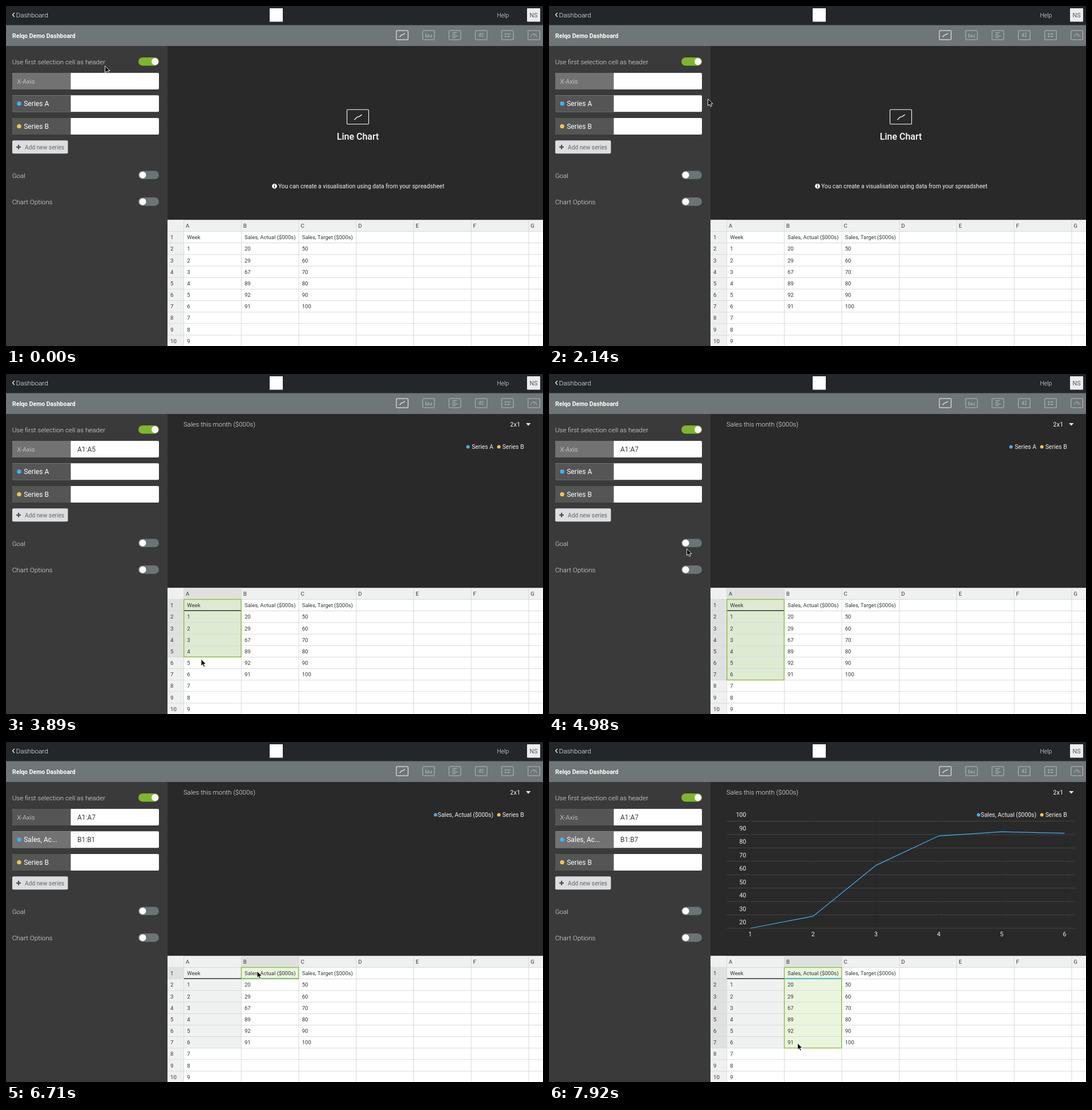
These frames come from a looping animation (941x595 px, 8 s). An HTML page:

```html
<!DOCTYPE html>
<html lang="en">
<head>
<meta charset="utf-8">
<title>Dashboard chart builder</title>
<style>
  html, body { margin: 0; width: 100%; height: 100%; overflow: hidden; background: #292929; }
  svg { display: block; width: 100%; height: 100%; }
  text { font-family: Roboto, "Liberation Sans", Arial, sans-serif; white-space: pre; }
</style>
</head>
<body>
<svg id="stage" viewBox="0 0 941 595"></svg>
<script>
const LOOP = 8000;
const CLICK_A = 2950, FOCUS_B = 5800, CLICK_B = 6710;
const BLUE = '#3fb0f2', YELLOW = '#e6c84f', GREEN = '#8bc03f';
const GRID_X = 312, GRID_Y = 394.5, COL_W = 100.72, ROW_H = 20.17;
const FIELD_Y = [117, 156.3, 196];

// t, x, y, eased
const path = [
  [0, 173.5, 105], [119, 173.5, 105], [120, 199, 103], [240, 200, 103],
  [930, 695, 55, 1], [1110, 695, 55], [1280, 588.5, 80], [1850, 268.5, 125], [1970, 268.5, 125],
  [2710, 342.5, 404, 1], [3250, 342.5, 404], [3890, 342, 499], [3950, 341.5, 511], [4000, 341, 518],
  [4120, 339.5, 521], [4630, 339.5, 521], [5210, 190, 193, 1], [5450, 190, 193], [5690, 179.5, 181, 1],
  [6040, 179.5, 181], [6220, 235, 142], [6540, 440, 401], [6890, 440, 401], [7160, 436.5, 460],
  [7600, 435, 516], [7750, 435, 521], [7920, 435.5, 527], [LOOP, 435.5, 527]
];
const header = ['Week', 'Sales, Actual ($000s)', 'Sales, Target ($000s)'];
const actual = [20, 29, 67, 89, 92, 91];
const target = [50, 60, 70, 80, 90, 100];

const colX = i => GRID_X + COL_W * i;
const rowY = i => GRID_Y + ROW_H * i;
const rect = (x, y, w, h, fill, extra = '') =>
  `<rect x="${x}" y="${y}" width="${w}" height="${h}" fill="${fill}" ${extra}/>`;
const dot = (x, y, r, fill) => `<circle cx="${x}" cy="${y}" r="${r}" fill="${fill}"/>`;
const line = (x1, y1, x2, y2, stroke, w = 1) =>
  `<line x1="${x1}" y1="${y1}" x2="${x2}" y2="${y2}" stroke="${stroke}" stroke-width="${w}"/>`;
const curve = (d, stroke, w = 1) => `<path d="${d}" fill="none" stroke="${stroke}" stroke-width="${w}"/>`;
// y is the middle of the capitals
const text = (x, y, str, size, fill, weight = 400, extra = '') =>
  `<text x="${x}" y="${y + size * 0.355}" font-size="${size}" fill="${fill}" font-weight="${weight}" ${extra}>${str}</text>`;
const END = 'text-anchor="end"', MID = 'text-anchor="middle"';

function toggle(y, on) {
  return rect(232, y - 7.3, 36, 14.6, on ? '#80b52f' : '#6b7375', 'rx="7.3"') +
    dot(on ? 261 : 239.5, y, 6, '#fff');
}

const squiggle = 'M-5 3.2C-2.6 2.8-2.6-.4-.6-.3S2-.8 5-3.4';

function iconBar() {
  const soft = '#b8bebf';
  const art = [
    curve(squiggle, '#fff', 1.2),
    [7, 4, 6, 3, 5].map((h, i) => line(i * 2.4 - 4.8, 4, i * 2.4 - 4.8, 4 - h, soft)).join(''),
    [8, 5, 9, 6].map((w, i) => line(-4.5, i * 2.8 - 4.2, w - 4.5, i * 2.8 - 4.2, soft)).join(''),
    text(0, 0, '42', 8.4, soft, 400, MID),
    [-2.2, 2.2].map(y => rect(-4.5, y - 1, 2.2, 2, soft) + line(-0.5, y, 4.5, y, soft, 1.3)).join(''),
    curve('M-5 2.8A5 5 0 0 1 5 2.8M0 2.5L2.5-.5', soft)
  ];
  return art.map((a, i) =>
    `<g transform="translate(${694.3 + i * 46.15} 51)">` +
    `<rect x="-10.3" y="-8" width="20.6" height="16" rx="1" fill="none" stroke="${i ? soft : '#fff'}"/>${a}</g>`).join('');
}

function chrome() {
  return rect(0, 0, 941, 595, '#292929') +
    rect(0, 70, 283, 525, '#3a3a3a') +
    rect(0, 0, 941, 33.5, '#23272a') +
    rect(0, 33.5, 941, 36.5, '#6e7677') +
    curve('M14.6 12L11.6 15.5L14.6 19', '#fff', 1.2) +
    text(17.5, 15.5, 'Dashboard', 11.8, '#f4f4f4', 300) +
    rect(462, 4, 23, 23.5, '#fff') +
    text(860.5, 16, 'Help', 10.3, '#f4f4f4', 300) +
    rect(913, 4, 23, 23.5, '#ebecee', 'rx="1"') +
    text(924.5, 16, 'NS', 10.8, '#555', 400, MID) +
    text(11, 51.8, 'Relqo Demo Dashboard', 10.5, '#fff', 700) +
    iconBar();
}

function sidebar() {
  return text(10.7, 98, 'Use first selection cell as header', 11.6, '#e6e6e6', 300) +
    toggle(97.2, true) +
    rect(11, 235.3, 97.5, 23, '#dcdee0', 'rx="2"') +
    line(18, 246.8, 26, 246.8, '#4d4d4d', 2.2) + line(22, 242.8, 22, 250.8, '#4d4d4d', 2.2) +
    text(33, 247, 'Add new series', 10.2, '#666') +
    text(10.7, 296.8, 'Goal', 11.6, '#e6e6e6', 300) + toggle(295.8, false) +
    text(10.7, 343.3, 'Chart Options', 11.7, '#e6e6e6', 300) + toggle(342.4, false);
}

function sheetBase() {
  return rect(283, 374.5, 658, 220.5, '#fff') +
    rect(283, 374.5, 658, 20, '#eff1f0') + rect(283, 374.5, 28.5, 220.5, '#eff1f0');
}

function sheetLines() {
  let s = '';
  for (let i = 0; i < 7; i++) {
    s += line(colX(i) - 0.4, 374.5, colX(i) - 0.4, 595, '#d8dada') +
      text(colX(i) + 3, 384.7, 'ABCDEFG'[i], 9.6, '#333');
  }
  for (let r = 0; r < 10; r++) {
    const y = rowY(r) + 10.3;
    s += line(283, rowY(r), 941, rowY(r), '#d8dada') + text(288, y, r + 1, 9.6, '#333');
    const cells = r ? [r, actual[r - 1], target[r - 1]] : header;
    cells.forEach((c, i) => {
      if (c !== undefined) s += text(colX(i) + 5.3, y, c, 9.5, '#333');
    });
  }
  return s;
}

// Ranges and header shading, below the grid lines
function ranges(s) {
  let out = '';
  const counts = [s.a, s.b];
  counts.forEach((n, c) => {
    if (n) out += rect(colX(c), GRID_Y, COL_W, ROW_H * n, c ? '#fff' : '#f0f2f1');
  });
  if (s.sel >= 0) {
    const n = counts[s.sel];
    out += rect(colX(s.sel), 374.5, COL_W, 20, '#dfe1e0') +
      rect(283, GRID_Y, 28.5, ROW_H * n, '#dfe1e0') +
      rect(colX(s.sel), GRID_Y, COL_W, ROW_H * n, GREEN, 'opacity=".17"');
  }
  return out;
}

function outlines(s) {
  let out = '';
  const under = (c, stroke) => line(colX(c), rowY(1) - 0.5, colX(c + 1) - 0.5, rowY(1) - 0.5, stroke, 1.8);
  if (s.a) out += under(0, '#4a4d4e');
  if (s.b) out += under(1, '#35a4e0');
  if (s.sel >= 0) {
    const n = s.sel ? s.b : s.a;
    out += rect(colX(s.sel) - 0.3, GRID_Y, COL_W - 0.4, ROW_H * n - 0.2, 'none', `stroke="${GREEN}" stroke-width="1.4"`);
  }
  return out;
}

function fields(s) {
  const names = ['X-Axis', s.b ? 'Sales, Ac...' : 'Series A', 'Series B'];
  const values = [s.a ? 'A1:A' + s.a : '', s.b ? 'B1:B' + s.b : '', ''];
  return FIELD_Y.map((y, i) => {
    const mid = y + 14.5;
    return rect(11, y, 257, 29, '#fff', 'rx="2"') +
      `<path d="M113.5 ${y}H13a2 2 0 0 0-2 2v25a2 2 0 0 0 2 2H113.5z" fill="${i === s.active ? '#727272' : '#555'}"/>` +
      (i ? dot(23, mid, 3.8, i === 1 ? BLUE : YELLOW) : '') +
      text(i ? 31.2 : 19.2, mid, names[i], i ? 12.1 : 11.6, i ? '#fff' : '#e2e2e2', i ? 400 : 300) +
      text(125, mid, values[i], 12, '#3c3c3c');
  }).join('') + (s.caret ? line(125.5, 164, 125.5, 178, '#222') : '');
}

function placeholder() {
  return rect(597.5, 181.3, 38, 25.5, 'none', 'rx="1.5" stroke="#fff" stroke-width="1.1"') +
    `<g transform="translate(617 194.5) scale(1.35)">${curve(squiggle, '#fff')}</g>` +
    text(616.5, 228.3, 'Line Chart', 16, '#fff', 500, MID) +
    dot(470.5, 315.2, 4.3, '#fff') +
    line(470.6, 314.4, 470.6, 318, '#292929', 1.5) + line(470.6, 312, 470.6, 313.4, '#292929', 1.5) +
    text(477, 315.3, 'You can create a visualisation using data from your spreadsheet', 10.25, '#f4f4f4');
}

function niceStep(span, count) {
  const step = 10 ** Math.floor(Math.log10(span / count) + 1e-9);
  const err = count * step / span;
  return step * (err <= 0.15 ? 10 : err <= 0.35 ? 5 : err <= 0.75 ? 2 : 1);
}

function plot(n) {
  const left = 352.5, right = 903.5, top = 138.5, bottom = 326;
  const data = actual.slice(0, n), max = Math.max(...data), low = 20;
  const dy = niceStep(max - low, 10), high = Math.ceil(max / dy) * dy;
  const dx = niceStep(n - 1, 5);
  const px = v => left + (v - 1) / (n - 1) * (right - left);
  const py = v => bottom - (v - low) / (high - low) * (bottom - top);
  let out = '';
  for (let v = low; v <= high; v += dy) {
    out += line(311.5, py(v), 921.5, py(v), '#454545') + text(345.5, py(v) - 10.8, v, 10.6, '#f0f0f0', 400, END);
  }
  for (let i = 0; i * dx <= n - 1 + 1e-6; i++) {
    const v = +(1 + i * dx).toFixed(1);
    out += line(px(v), top - 1, px(v), bottom + 1, '#292929', 1.5) +
      text(px(v), 336.3, v, 10.6, '#f0f0f0', 400, MID);
  }
  return out + curve('M' + data.map((v, i) => px(i + 1) + ' ' + py(v)).join('L'), BLUE, 1.25);
}

function chart(s) {
  if (!s.a) return placeholder();
  return (s.b > 2 ? plot(s.b - 1) : '') +
    text(311, 87.7, 'Sales this month ($000s)', 11.5, '#f0f0f0', 300) +
    text(883.5, 88, '2x1', 10.3, '#fff', 400, 'letter-spacing=".4"') +
    '<path d="M911.3 86H919.3L915.3 90.4z" fill="#fff"/>' +
    dot(s.b ? 752.7 : 809.5, 127.5, 3, BLUE) +
    text(854, 127.7, s.b ? header[1] : 'Series A', 10.35, '#f0f0f0', 400, END) +
    dot(863.6, 127.5, 3, YELLOW) +
    text(907.7, 127.7, 'Series B', 10.5, '#f0f0f0', 400, END);
}

function pointer(t) {
  const i = Math.max(1, path.findIndex(p => p[0] > t));
  const [t0, x0, y0] = path[i - 1], [t1, x1, y1, eased] = path[i];
  let k = (t - t0) / (t1 - t0);
  if (eased) k = k * k * (3 - 2 * k);
  return { x: x0 + (x1 - x0) * k, y: y0 + (y1 - y0) * k };
}

// The selection trails the pointer slightly
const dragRow = t => Math.max(1, Math.min(7, 1 + Math.floor((pointer(t - 70).y - GRID_Y) / ROW_H)));

function stateAt(t) {
  return {
    a: t < CLICK_A ? 0 : t < 4200 ? dragRow(t) : 7,
    b: t < CLICK_B ? 0 : dragRow(t),
    sel: t < CLICK_A ? -1 : t < FOCUS_B ? 0 : t < CLICK_B ? -1 : 1,
    active: t < FOCUS_B ? 0 : 1,
    caret: t >= FOCUS_B && t < FOCUS_B + 500
  };
}

const arrow = '<path d="M0 0V11.6L2.7 9.1L4.5 13.3L6.6 12.4L4.8 8.4H8.5z" fill="#000" stroke="#fff" stroke-width=".9"/>';
const beam = curve('M-2.8-6Q0-6 0-4.5V4.5Q0 6-2.8 6M2.8-6Q0-6 0-4.5M0 4.5Q0 6 2.8 6M-1.5 2H1.5', '#222', 1.1);

const stage = document.getElementById('stage');
stage.innerHTML = chrome() + sidebar() + sheetBase() + '<g id="ranges"></g>' + sheetLines() +
  '<g id="outlines"></g><g id="fields"></g><g id="chart"></g>' +
  `<g id="cursor"><g id="arrow">${arrow}</g><g id="beam">${beam}</g></g>`;
const part = id => document.getElementById(id);
const layers = { ranges, outlines, fields, chart };
let lastKey = '';

function draw(t) {
  const s = stateAt(t), key = JSON.stringify(s);
  if (key !== lastKey) {
    for (const id in layers) part(id).innerHTML = layers[id](s);
    lastKey = key;
  }
  const { x, y } = pointer(t);
  const typing = x > 113 && x < 268 && FIELD_Y.some(f => y > f && y < f + 29);
  part('cursor').setAttribute('transform', `translate(${x} ${y})`);
  part('arrow').style.display = typing ? 'none' : '';
  part('beam').style.display = typing ? '' : 'none';
}

const start = performance.now();
function tick() {
  draw((performance.now() - start) % LOOP);
  requestAnimationFrame(tick);
}
tick();
</script>
</body>
</html>
```
